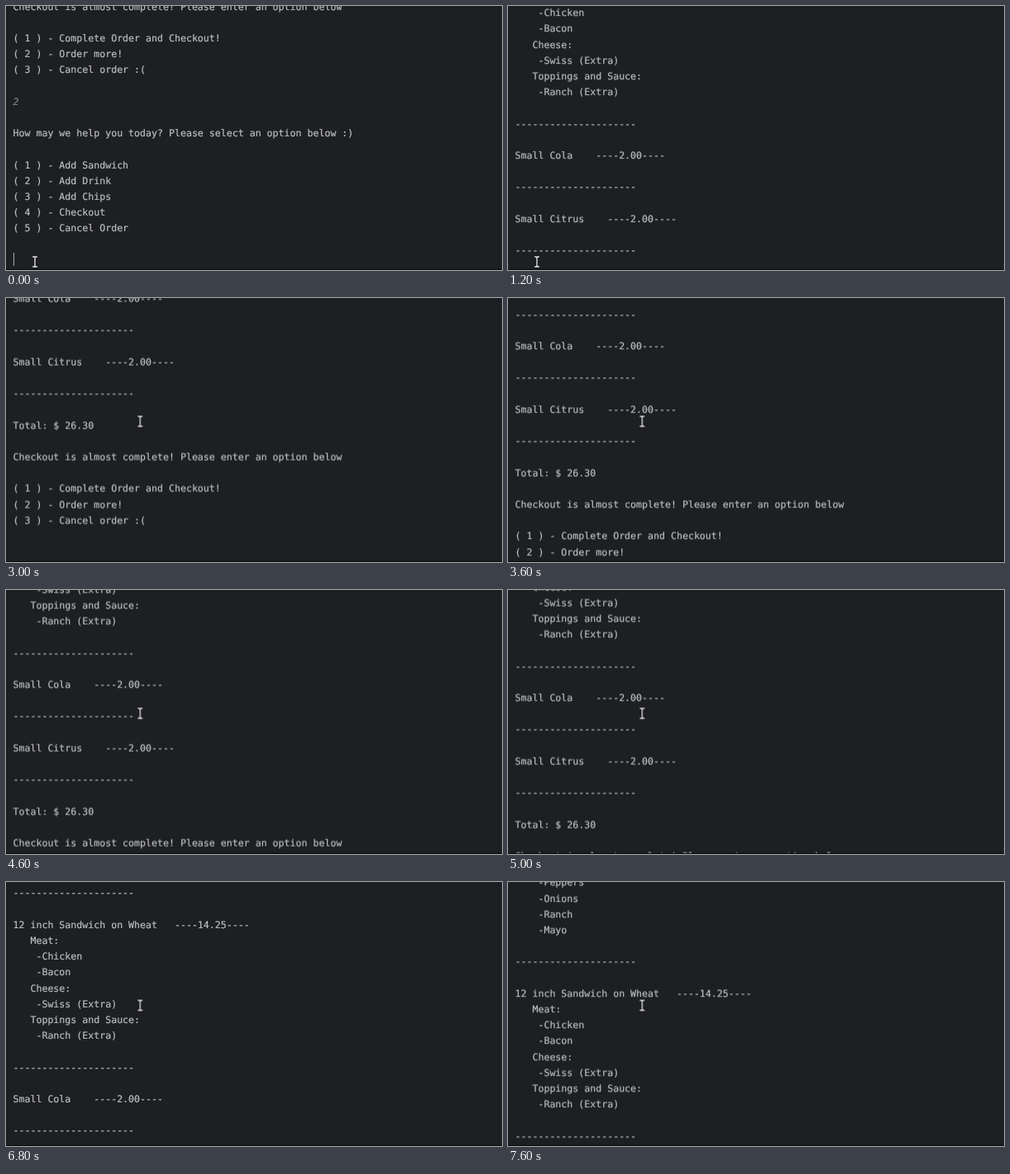
Recreate the animation shown at these times as an HTML page. Size 600 by 320 pixels, loop 8000 ms.

```html
<!DOCTYPE html>
<html lang="en">
<head>
<meta charset="utf-8">
<title>Deli console</title>
<style>
  html, body { margin: 0; width: 100%; height: 100%; overflow: hidden; background: #1e1f22; }
  #stage { position: absolute; left: 0; top: 0; width: 600px; height: 320px; overflow: hidden; background: #1e1f22; }
  #log {
    position: absolute; left: 8.5px; bottom: 1.5px; margin: 0; white-space: pre;
    font: 11.6px/19.2px "DejaVu Sans Mono", monospace; color: #bcbec4;
    -webkit-text-stroke: 0.2px; text-rendering: geometricPrecision; font-variant-ligatures: none;
  }
  #log i { color: #85877f; }
  #caret { position: absolute; left: 9px; top: 299px; width: 1px; height: 16px; background: #a6a8ae; }
  #mouse { position: absolute; left: -5px; top: -9px; }
  #edge { position: absolute; left: 0; top: 319px; width: 600px; height: 1px; background: #08090a; }
</style>
</head>
<body>
<div id="stage">
  <pre id="log"></pre>
  <div id="caret"></div>
  <svg id="mouse" width="10" height="18" viewBox="-5 -9 10 18" fill="none">
    <defs><path id="beam" d="M-2.8-6H-1Q0-6 0-5Q0-6 1-6H2.8M0-5V5M-2.8 6H-1Q0 6 0 5Q0 6 1 6H2.8"/></defs>
    <use href="#beam" stroke="#111214" stroke-width="2.8"/>
    <use href="#beam" stroke="#f2f2f2" stroke-width="1.3"/>
  </svg>
  <div id="edge"></div>
</div>
<script>
const LOOP = 8000, ROW = 19.2;
const $ = id => document.getElementById(id);

const rule = ['', '-'.repeat(21), ''];
const options = list => list.map((s, i) => `( ${i + 1} ) - ${s}`);
const priced = (name, gap, price) => name + ' '.repeat(gap) + `----${price}----`;
const part = (title, items) => [`   ${title}:`, ...items.map(s => `    -${s}`)];
const checkout = [
  'Checkout is almost complete! Please enter an option below', '',
  ...options(['Complete Order and Checkout!', 'Order more!', 'Cancel order :(']), ''
];

const before = [
  ...checkout, '<i>2</i>', '',
  'How may we help you today? Please select an option below :)', '',
  ...options(['Add Sandwich', 'Add Drink', 'Add Chips', 'Checkout', 'Cancel Order']), ''
];
const receipt = [
  '<i id="typed">4</i>', '',
  'Here is everything you have ordered so far. Please look it over before paying',
  ...rule,
  priced('4 inch Sandwich on White', 3, '8.05'),
  ...part('Meat', ['Turkey']),
  ...part('Cheese', ['Provolone']),
  ...part('Toppings and Sauce', ['Lettuce', 'Peppers', 'Onions', 'Ranch', 'Mayo']),
  ...rule,
  priced('12 inch Sandwich on Wheat', 3, '14.25'),
  ...part('Meat', ['Chicken', 'Bacon']),
  ...part('Cheese', ['Swiss (Extra)']),
  ...part('Toppings and Sauce', ['Ranch (Extra)']),
  ...rule, priced('Small Cola', 4, '2.00'),
  ...rule, priced('Small Citrus', 4, '2.00'),
  ...rule, 'Total: $ 26.30', '',
  ...checkout, ' '
];
$('log').innerHTML = [...before, ...receipt].join('\n');

// Play [time, value] pairs as hard steps.
function play(id, steps, style) {
  const frames = steps.map(([t, v]) => ({ offset: t / LOOP, easing: 'steps(1, end)', ...style(v) }));
  frames.push({ ...frames[frames.length - 1], offset: 1 });
  $(id).animate(frames, { duration: LOOP, iterations: Infinity });
}
const move = ([x, y]) => ({ transform: `translate(${x}px, ${y}px)` });
const fade = v => ({ opacity: v });

// Distance from the end of the log; each wheel notch is three rows.
const notch = n => n * 3 * ROW;
play('log', [
  [0, (receipt.length - 1) * ROW], [600, 890], [800, 876], [1000, 620], [1200, 180.5], [1400, 0],
  [3400, 39], [3600, notch(1)], [4600, 114], [4800, notch(2)], [5000, 130], [5200, notch(3)],
  [5600, notch(4)], [6800, 262.4], [7000, notch(5)], [7400, 290], [7600, notch(6)]
], y => move([0, y]));

play('typed', [[0, 0], [400, 1]], fade);
play('caret', [[0, 1], [600, 0], [1400, 1], [2000, 0], [2400, 1], [3000, 0]], fade);
play('caret', [[0, [0, 0]], [400, [7, 0]], [600, [0, 0]]], move);
play('mouse', [[0, [35, 310]], [1800, [52, 286.5]], [2000, [158, 151]], [2200, [162.3, 149.5]]], move);
</script>
</body>
</html>
```
